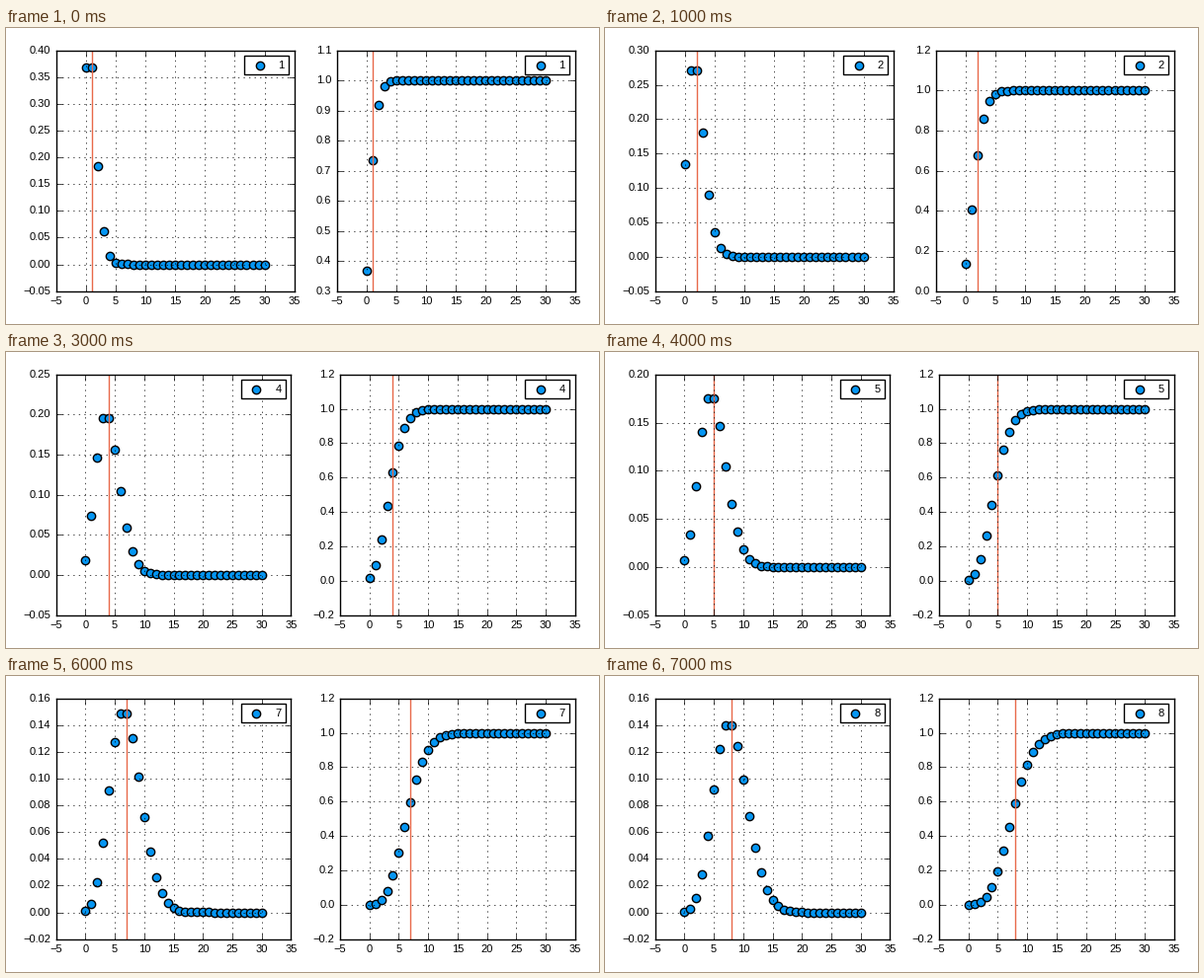
A matplotlib script that plays this animation: 600x300 px, repeating every 8 s.

```python
import math

import numpy as np
import matplotlib.pyplot as plt
from matplotlib.animation import FuncAnimation

W, H, DPI = 600, 300, 100
BLUE, RED = "#0596f3", "#e8694a"
BOTTOM, TOP = 33.4, 277.2
LEFT, RIGHT = 50.6, 575.8

plt.style.use("classic")
plt.rcParams.update({
    "font.family": "Liberation Sans",
    "font.size": 12,
    "xtick.labelsize": 8,
    "ytick.labelsize": 8,
    "legend.fontsize": 8,
    "legend.scatterpoints": 1,
    "legend.handletextpad": 0.7,
    "axes.grid": True,
    "axes.xmargin": 0.05,
    "axes.ymargin": 0.05,
    "figure.facecolor": "white",
    "savefig.facecolor": "white",
})

fig = plt.figure(figsize=(W / DPI, H / DPI), dpi=DPI)
axes = [fig.add_axes([x, 0.1, 0.4, 0.8]) for x in (0.1, 0.55)]
ks = np.arange(31)


def poisson(mu):
    return np.array([math.exp(-mu) * mu**k / math.factorial(k) for k in ks])


def place(ax, x0, x1):
    ax.set_position([x0 / W, BOTTOM / H, (x1 - x0) / W, (TOP - BOTTOM) / H])


def plot(ax, values, mu):
    ax.clear()
    ax.scatter(ks, values, s=36, c=BLUE, edgecolors="black", linewidths=1,
               label=str(mu))
    ax.axvline(mu, color=RED, linewidth=1)
    ax.legend(loc="upper right")


def draw(frame):
    mu = frame + 1
    pmf = poisson(mu)
    for ax, values in zip(axes, (pmf, np.cumsum(pmf))):
        plot(ax, values, mu)
    # a minus sign in the right-hand labels takes room from both panels
    width = 237.85 if axes[1].get_ylim()[0] < -0.01 else 241.1
    place(axes[0], LEFT, LEFT + width)
    place(axes[1], RIGHT - width, RIGHT)
    return []


anim = FuncAnimation(fig, draw, frames=8, interval=1000, repeat=True,
                     init_func=lambda: [], blit=False)
plt.show()
```
